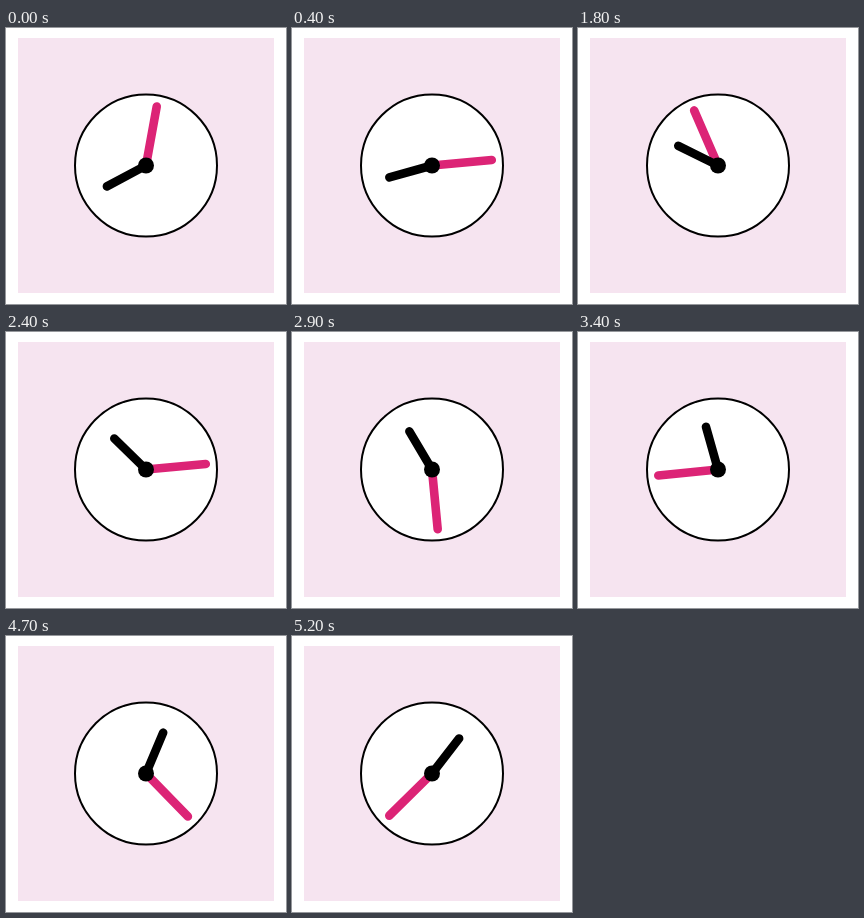
Animation, 280 px wide and 276 px high, one loop 5300 ms. Source, as an HTML page:

```html
<!DOCTYPE html>
<html lang="en">
<head>
<meta charset="utf-8">
<title>Clock</title>
<style>
  html, body { margin: 0; width: 100%; height: 100%; overflow: hidden; background: #fff; }
  svg { display: block; width: 280px; height: 276px; }
  .hand { stroke-width: 8.6; stroke-linecap: round; }
</style>
</head>
<body>
<svg viewBox="0 0 280 276">
  <rect x="12" y="10" width="256" height="255" fill="#f6e4f0"/>
  <g transform="translate(140 137.5)">
    <circle r="71" fill="#fff" stroke="#000" stroke-width="2"/>
    <line id="minute" class="hand" y2="-60" stroke="#dc2476"/>
    <line id="hour" class="hand" y2="-44.3" stroke="#000"/>
    <circle r="8"/>
  </g>
</svg>
<script>
  const LOOP = 5300, STEP = 100;

  // [time in ms, minute hand angle in degrees]
  const path = [
    [0, 10.3], [400, 84.8], [1200, 228.4], [2400, 444.8],
    [3400, 624.3], [4200, 766], [5200, 945.4]
  ];

  const minute = document.getElementById('minute');
  const hour = document.getElementById('hour');
  const turn = (hand, angle) => hand.setAttribute('transform', `rotate(${angle})`);

  function angleAt(t) {
    let i = 1;
    while (i < path.length - 1 && t > path[i][0]) i++;
    const [t0, a0] = path[i - 1], [t1, a1] = path[i];
    return a0 + (a1 - a0) * (t - t0) / (t1 - t0);
  }

  function draw(t) {
    const angle = angleAt(Math.floor(t / STEP) * STEP);
    turn(minute, angle);
    turn(hour, 240.2 + angle / 6);
  }

  const start = performance.now();
  function tick() {
    draw((performance.now() - start) % LOOP);
    requestAnimationFrame(tick);
  }
  tick();
</script>
</body>
</html>
```
